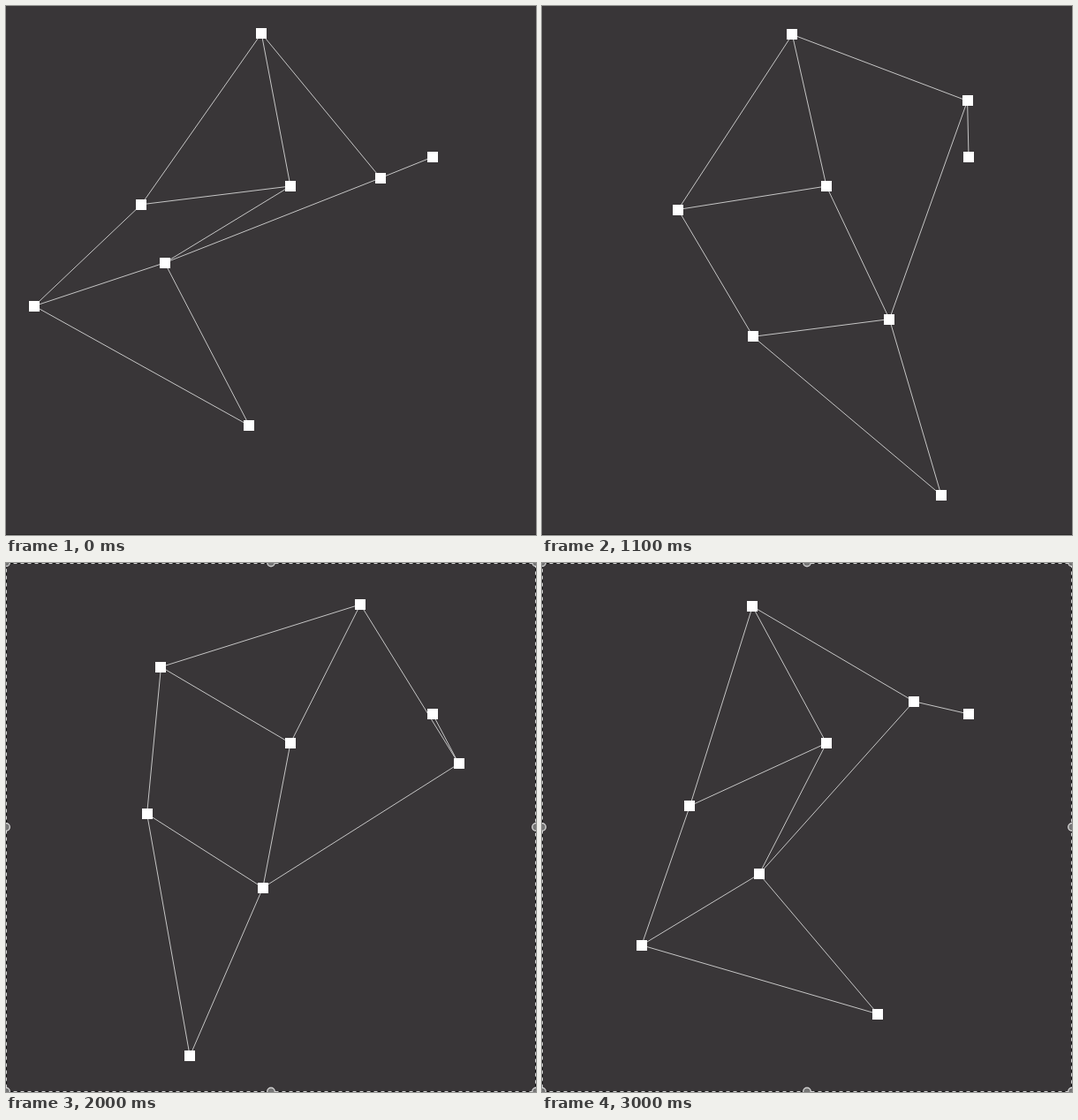
These frames come from a looping animation (600x599 px, 3.1 s). An HTML page with a canvas:

```html
<!DOCTYPE html>
<html lang="en">
<head>
<meta charset="utf-8">
<title>Walking linkage</title>
<style>
html, body { margin: 0; width: 100%; height: 100%; overflow: hidden; background: #393638; }
canvas { display: block; }
</style>
</head>
<body>
<canvas id="stage" width="600" height="599"></canvas>
<script>
const W = 600, H = 599, LOOP = 3100, STEP = 100, SELECTED_AT = 1300;
const ctx = document.getElementById('stage').getContext('2d');

// Bar lengths of a Jansen leg, scaled to pixels
const S = 4.24;
const bar = {
  b: 41.5, c: 39.3, d: 40.1, e: 55.8, f: 39.4, g: 36.7,
  h: 65.7, i: 49, j: 50, k: 61.9, m: 15
};
for (const key in bar) bar[key] *= S;

const axle = [483, 171], pivot = [322, 204];

// Meeting point of two bars hinged at p and q; side picks the solution
function joint(p, q, rp, rq, side) {
  const dx = q[0] - p[0], dy = q[1] - p[1], len = Math.hypot(dx, dy);
  const along = (rp * rp - rq * rq + len * len) / (2 * len);
  const off = side * Math.sqrt(Math.max(0, rp * rp - along * along));
  return [
    p[0] + (dx * along - dy * off) / len,
    p[1] + (dy * along + dx * off) / len
  ];
}

// The crank starts slightly slower than it runs
function crankAngle(n) {
  return 1.209 - (n < 4 ? 0.3875 : 0.4003) * (n - 4);
}

function drawLeg(angle) {
  const crank = [axle[0] + bar.m * Math.cos(angle), axle[1] + bar.m * Math.sin(angle)];
  const top = joint(pivot, crank, bar.b, bar.j, -1);
  const low = joint(pivot, crank, bar.c, bar.k, 1);
  const back = joint(pivot, top, bar.d, bar.e, -1);
  const knee = joint(back, low, bar.f, bar.g, 1);
  const foot = joint(knee, low, bar.h, bar.i, 1);

  ctx.strokeStyle = '#c6c6c6';
  ctx.lineWidth = 1;
  ctx.beginPath();
  for (const path of [
    [axle, crank, top, pivot, back, top],
    [back, knee, low, pivot],
    [crank, low, foot, knee]
  ]) path.forEach(([x, y], i) => i ? ctx.lineTo(x, y) : ctx.moveTo(x, y));
  ctx.stroke();

  ctx.fillStyle = '#fff';
  for (const [x, y] of [axle, pivot, crank, top, low, back, knee, foot])
    ctx.fillRect(Math.round(x) - 6, Math.round(y) - 6, 12, 12);
}

function drawSelection() {
  ctx.lineWidth = 1;
  for (const [color, dash] of [['#111', []], ['#d0d0d0', [4, 4]]]) {
    ctx.strokeStyle = color;
    ctx.setLineDash(dash);
    ctx.strokeRect(0.5, 0.5, W - 1, H - 1);
  }
  ctx.setLineDash([]);

  ctx.fillStyle = '#777';
  ctx.strokeStyle = '#e4e4e4';
  ctx.lineWidth = 1.2;
  for (const x of [0, 300, 600]) for (const y of [-0.5, 299, 598.5]) {
    if (x === 300 && y === 299) continue;
    ctx.beginPath();
    ctx.arc(x, y, 4.3, 0, Math.PI * 2);
    ctx.fill();
    ctx.stroke();
  }
}

function draw(now) {
  const t = now % LOOP;
  ctx.fillStyle = '#393638';
  ctx.fillRect(0, 0, W, H);
  ctx.fillStyle = '#2b292a';
  ctx.fillRect(0, H - 1, W, 1);
  drawLeg(crankAngle(Math.floor(t / STEP)));
  if (t >= SELECTED_AT) drawSelection();
}

const start = performance.now();
function tick() {
  draw(performance.now() - start);
  requestAnimationFrame(tick);
}
tick();
</script>
</body>
</html>
```
